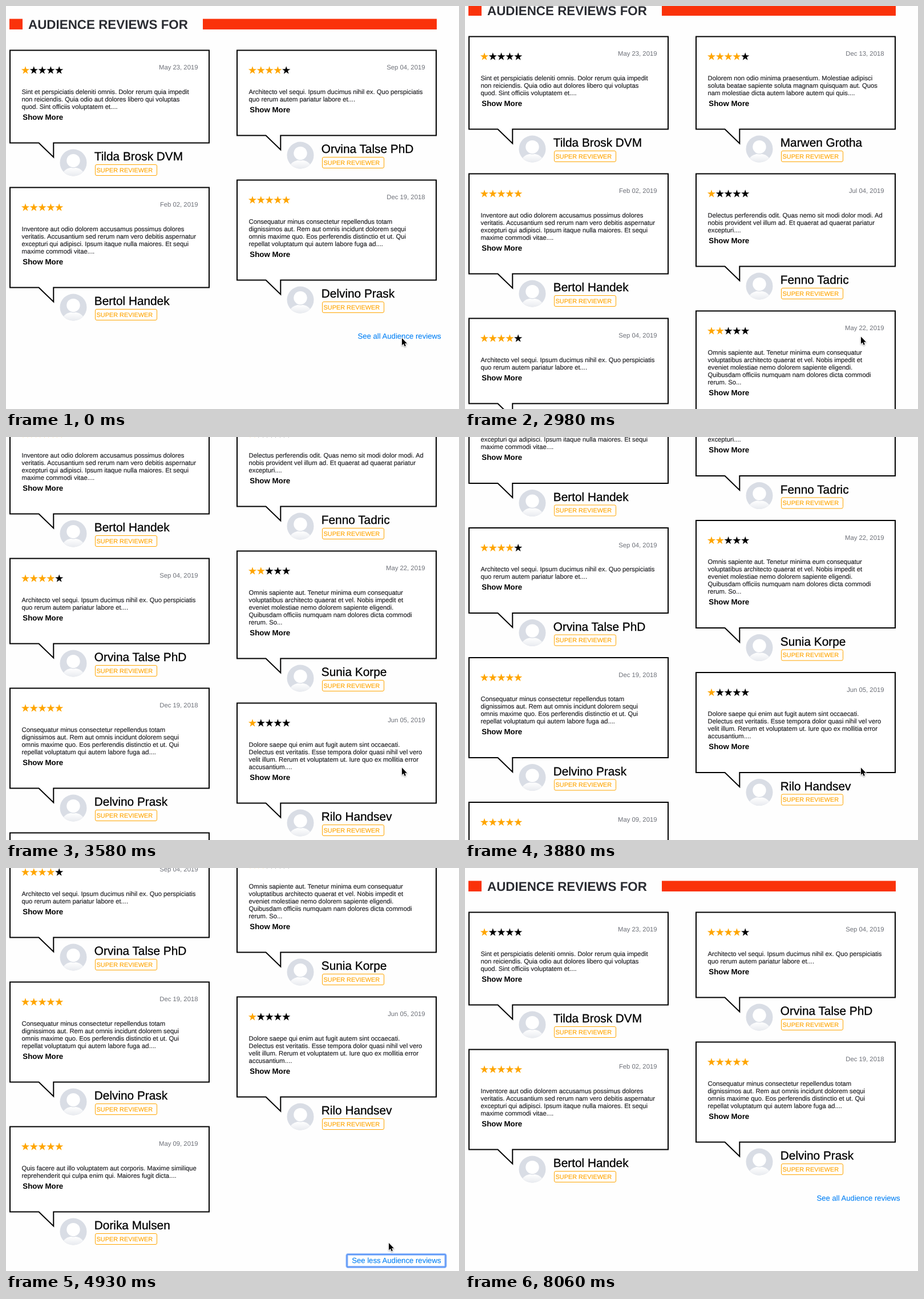
Recreate the animation shown at these times as an HTML page. Size 794 by 705 pixels, loop 8.52 s.

```html
<!DOCTYPE html>
<html lang="en">
<head>
<meta charset="utf-8">
<title>Audience reviews</title>
<style>
  html, body { margin: 0; width: 100%; height: 100%; overflow: hidden; background: #fefefe; }
  svg { display: block; width: 794px; height: 705px; overflow: hidden;
        font-family: "Liberation Sans", Arial, sans-serif; text-rendering: geometricPrecision; }
  .title { font-size: 22.4px; font-weight: bold; fill: #2a2c32; }
  .bar { fill: #fa320a; }
  .bubble { fill: #fff; stroke: #000; stroke-width: 2; }
  .date { font-size: 11.3px; fill: #6d7078; text-anchor: end; }
  .body { font-size: 11.28px; fill: #1c1c20; stroke: #1c1c20; stroke-width: .15; }
  .more { font-size: 13.3px; font-weight: bold; }
  .name { font-size: 20.8px; stroke: #000; stroke-width: .3; }
  .badge { font-size: 10.9px; fill: #ffa500; stroke: #ffa500; stroke-width: .15; }
  .pill { fill: #fff; stroke: #ffa500; }
  .on { fill: #ffa500; }
  .link { font-size: 13.15px; fill: #0f86f5; stroke: #0f86f5; stroke-width: .15; text-anchor: end; }
  .ring rect { fill: none; stroke: #5b96f7; }
  .glow { stroke-width: 4.5; opacity: .45; }
  .edge { stroke-width: 2.2; }
  #cursor path { stroke: #fff; stroke-width: 1.8; paint-order: stroke; stroke-linejoin: round;
                 filter: drop-shadow(0 1px 1px rgba(0, 0, 0, .35)); }
</style>
</head>
<body>
<svg viewBox="0 0 794 705">
  <defs>
    <linearGradient id="fade" x1="0" y1="0" x2="0" y2="1">
      <stop offset="0" stop-color="#fff"/>
      <stop offset="1" stop-color="#d9dde5"/>
    </linearGradient>
    <clipPath id="disc"><circle r="23.5"/></clipPath>
    <polygon id="star"/>
    <g id="avatar">
      <circle r="23.5" fill="#d9dde5"/>
      <g clip-path="url(#disc)"><ellipse cy="21" rx="18.5" ry="12.5" fill="url(#fade)"/></g>
      <circle cy="-3.5" r="13" fill="#d9dde5"/>
      <circle cy="-3.5" r="11.7" fill="#fff"/>
    </g>
  </defs>
  <g id="page">
    <rect class="bar" x="6" y="22.5" width="23" height="18.5"/>
    <text class="title" x="39" y="39.5">AUDIENCE REVIEWS FOR</text>
    <rect class="bar" x="345" y="22.5" width="410" height="18.5"/>
    <g id="short"></g>
    <g id="long"></g>
  </g>
  <g id="cursor"><path d="M0 0V12.6L2.9 10 4.8 14.5 6.8 13.6 4.9 9.2H8.9Z"/></g>
</svg>
<script>
const $ = id => document.getElementById(id);

const review = (name, date, stars, ...lines) => ({ name, date, stars, lines });

const tilda = review('Tilda Brosk DVM', 'May 23, 2019', 1,
  'Sint et perspiciatis deleniti omnis. Dolor rerum quia impedit',
  'non reiciendis. Quia odio aut dolores libero qui voluptas',
  'quod. Sint officiis voluptatem et....');
const bertol = review('Bertol Handek', 'Feb 02, 2019', 5,
  'Inventore aut odio dolorem accusamus possimus dolores',
  'veritatis. Accusantium sed rerum nam vero debitis aspernatur',
  'excepturi qui adipisci. Ipsum itaque nulla maiores. Et sequi',
  'maxime commodi vitae....');
const orvina = review('Orvina Talse PhD', 'Sep 04, 2019', 4,
  'Architecto vel sequi. Ipsum ducimus nihil ex. Quo perspiciatis',
  'quo rerum autem pariatur labore et....');
const delvino = review('Delvino Prask', 'Dec 19, 2018', 5,
  'Consequatur minus consectetur repellendus totam',
  'dignissimos aut. Rem aut omnis incidunt dolorem sequi',
  'omnis maxime quo. Eos perferendis distinctio et ut. Qui',
  'repellat voluptatum qui autem labore fuga ad....');
const dorika = review('Dorika Mulsen', 'May 09, 2019', 5,
  'Quis facere aut illo voluptatem aut corporis. Maxime similique',
  'reprehenderit qui culpa enim qui. Maiores fugit dicta....');
const marwen = review('Marwen Grotha', 'Dec 13, 2018', 4,
  'Dolorem non odio minima praesentium. Molestiae adipisci',
  'soluta beatae sapiente soluta magnam quisquam aut. Quos',
  'nam molestiae dicta autem labore autem qui quis....');
const fenno = review('Fenno Tadric', 'Jul 04, 2019', 1,
  'Delectus perferendis odit. Quas nemo sit modi dolor modi. Ad',
  'nobis provident vel illum ad. Et quaerat ad quaerat pariatur',
  'excepturi....');
const sunia = review('Sunia Korpe', 'May 22, 2019', 2,
  'Omnis sapiente aut. Tenetur minima eum consequatur',
  'voluptatibus architecto quaerat et vel. Nobis impedit et',
  'eveniet molestiae nemo dolorem sapiente eligendi.',
  'Quibusdam officiis numquam nam dolores dicta commodi',
  'rerum. So...');
const rilo = review('Rilo Handsev', 'Jun 05, 2019', 1,
  'Dolore saepe qui enim aut fugit autem sint occaecati.',
  'Delectus est veritatis. Esse tempora dolor quasi nihil vel vero',
  'velit illum. Rerum et voluptatem ut. Iure quo ex mollitia error',
  'accusantium....');

const text = (cls, x, y, s) => `<text class="${cls}" x="${x}" y="${y}">${s}</text>`;

function card({ name, date, stars, lines }, x, y) {
  const low = 123 + 13 * lines.length;
  const row = [0, 1, 2, 3, 4].map(i =>
    `<use href="#star" x="${34 + 14.8 * i}" y="35.2" class="${i < stars ? 'on' : ''}"/>`).join('');
  return `<g transform="translate(${x} ${y})">
    <path class="bubble" d="M7 0H356V${low}H83.3V${low + 25}L57.5 ${low}H7Z"/>
    ${row}${text('date', 336.5, 33.9, date)}
    ${lines.map((s, i) => text('body', 27.5, 76 + 13 * i, s)).join('')}
    ${text('more', 29.3, low - 41, 'Show More')}
    <use href="#avatar" x="118" y="${low + 34.6}"/>
    ${text('name', 154.8, low + 30.5, name)}
    <rect class="pill" x="156.5" y="${low + 38}" width="108" height="19" rx="2.5"/>
    ${text('badge', 158.5, low + 51, 'SUPER REVIEWER')}
  </g>`;
}

function column(list, x) {
  let y = 77.5;
  return list.map(r => {
    const svg = card(r, x, y);
    y += 201 + 13 * r.lines.length;
    return svg;
  }).join('');
}

function link(label, left, mid) {
  const ring = cls => `<rect class="${cls}" x="${left}" y="${mid - 11}" width="${770.5 - left}" height="22" rx="2"/>`;
  return `<g class="ring">${ring('glow')}${ring('edge')}</g>` +
    text('link', 762.5, mid + 4.3, label);
}

$('star').setAttribute('points', Array.from({ length: 10 }, (_, i) => {
  const r = i % 2 ? 2.9 : 7.5, a = i * Math.PI / 5;
  return `${(r * Math.sin(a)).toFixed(2)},${(-r * Math.cos(a)).toFixed(2)}`;
}).join(' '));

$('short').innerHTML = column([tilda, bertol], 0) + column([orvina, delvino], 398) +
  link('See all Audience reviews', 607.5, 578);
$('long').innerHTML = column([tilda, bertol, orvina, delvino, dorika], 0) +
  column([marwen, fenno, sunia, rilo], 398) +
  link('See less Audience reviews', 597.5, 1285);

// Each track lists [start in ms, value...]; a value holds until the next start.
const LOOP = 8520;
const scroll = [[0, 0], [2980, 24], [3130, 113], [3280, 216.5], [3430, 300], [3580, 358],
  [3730, 394], [3880, 411.5], [4030, 445], [4180, 530], [4330, 600], [4480, 598], [5820, 0]];
const pointer = [[0, 694, 581], [140, 680.5, 588.5], [590, 688, 583.5], [740, 694, 578.5],
  [4630, 691, 592], [4780, 682, 626], [4930, 671, 656], [5080, 668, 667], [5230, 664, 680],
  [5370, 661.8, 688], [6270, 662.5, 675], [6420, 664, 656], [6560, 665.3, 646],
  [7760, 690, 667], [7910, 722, 692], [8060, 900, 900]];

const at = (track, t) => track.findLast(k => k[0] <= t);
const show = (el, on) => el.setAttribute('visibility', on ? 'visible' : 'hidden');
const rings = document.querySelectorAll('.ring');
const start = performance.now();

function draw() {
  const t = (performance.now() - start) % LOOP;
  const open = t >= 1480 && t < 5820;
  const focus = t >= 1340 && t < 6860;
  const [, x, y] = at(pointer, t);
  show($('short'), !open);
  show($('long'), open);
  show(rings[0], focus && !open);
  show(rings[1], focus && open);
  $('page').setAttribute('transform', `translate(0 ${-at(scroll, t)[1]})`);
  $('cursor').setAttribute('transform', `translate(${x} ${y})`);
  requestAnimationFrame(draw);
}
draw();
</script>
</body>
</html>
```
